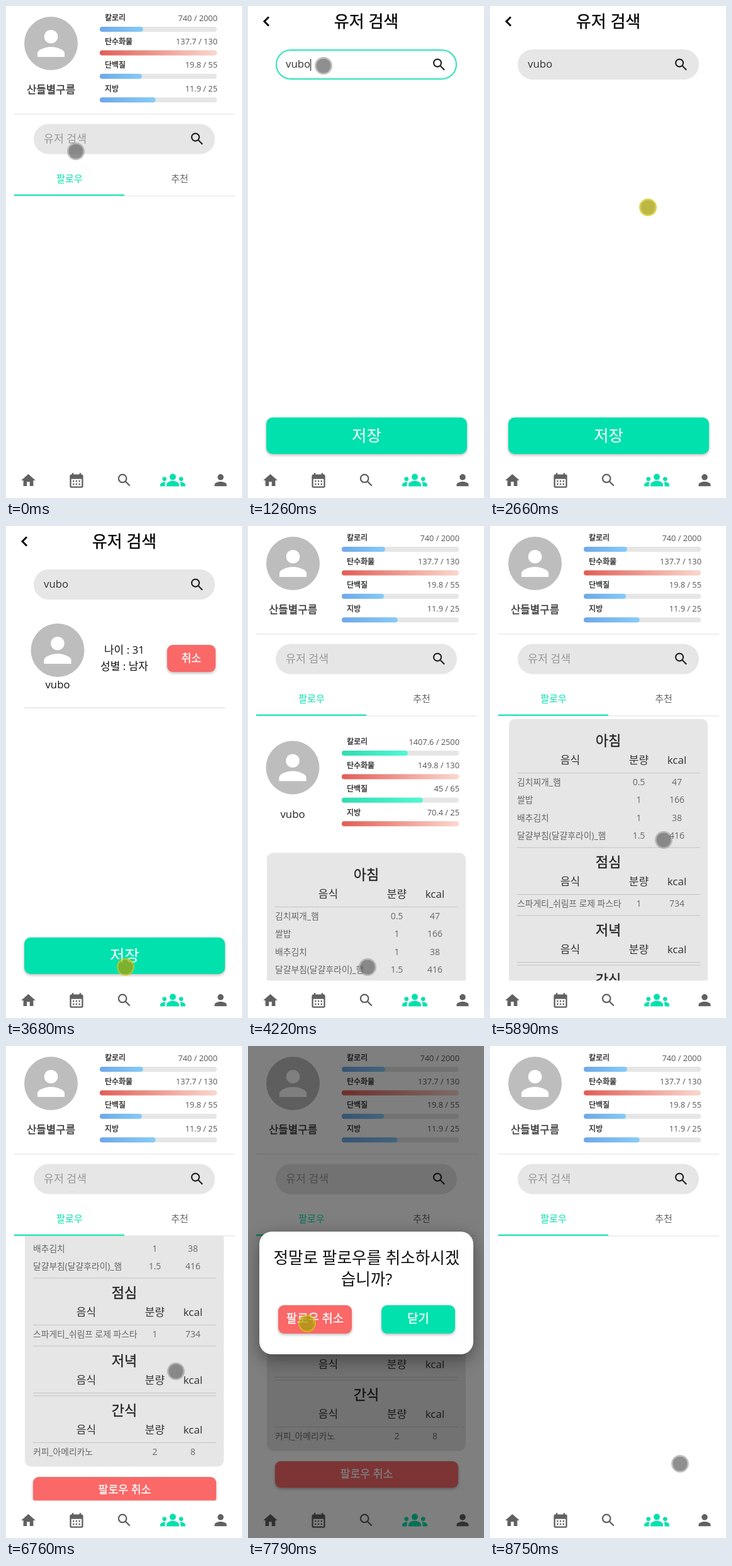
An HTML page for the animation above (8.82 s loop, 375x782 px).

```html
<!DOCTYPE html>
<html lang="ko">
<head>
<meta charset="utf-8">
<title>유저 검색</title>
<style>
html, body { margin: 0; width: 100%; height: 100%; overflow: hidden; background: #fff; }
svg { display: block; width: 375px; height: 782px; }
text { font-family: "Open Sans", "Noto Sans CJK KR", "Noto Sans CJK JP", sans-serif; white-space: pre; }
.med { stroke: currentColor; stroke-width: .3px; }
.btn { filter: drop-shadow(0 2px 2px rgba(0, 0, 0, .28)); }
.line { fill: none; stroke: currentColor; stroke-width: 2px; }
#box { filter: drop-shadow(0 8px 14px rgba(0, 0, 0, .4)); }
</style>
</head>
<body>
<svg id="stage" viewBox="0 0 375 782" xmlns="http://www.w3.org/2000/svg"></svg>
<script>
const LOOP = 8820;
const MINT = '#00e1ad', RED = '#fa6868', GREY = '#e6e6e6', DARK = '#616161';
const ME = '산들별구름', FRIEND = 'vubo';

const disc = (x, y, r, attrs = '') => `<circle cx="${x}" cy="${y}" r="${r}" ${attrs}/>`;
const path = (d, attrs = '') => `<path d="${d}" ${attrs}/>`;
const rect = (x, y, w, h, r, fill, attrs = '') =>
  `<rect x="${x}" y="${y}" width="${w}" height="${h}" rx="${r}" fill="${fill}" ${attrs}/>`;

// Icons on a 24 unit square
const person = disc(12, 8, 4) + path('M4 20v-2c0-2.7 5.3-4 8-4s8 1.3 8 4v2z');
const search = disc(9.5, 9.5, 5.5, 'class="line"') + path('M13.8 13.8l5.9 5.9', 'class="line"');
const house = path('M10 20v-6h4v6h5v-8h3L12 3 2 12h3v8z');
let calendar = rect(4, 5, 16, 16, 1, 'none', 'class="line"') + path('M4 5h16v5H4zM6 2h2v3H6zM16 2h2v3h-2z');
for (let i = 0; i < 6; i++) calendar += rect(7 + 4 * (i % 3), i < 3 ? 12 : 16, 2, 2, 0, 'currentColor');
const member = disc(4, 11, 2) + path('M0 18v-1.6c0-1.5 3-2.9 5.1-2.3q-.6 1-.6 2.3V18z');
const group = disc(12, 9, 3) + path('M6 18v-1.6c0-2.4 3.5-3.65 6-3.65s6 1.25 6 3.65V18z') +
  member + `<g transform="translate(24 0) scale(-1 1)">${member}</g>`;

// Icon with its own point (ox, oy) placed at (x, y)
const icon = (art, x, y, k, fill, ox = 12, oy = 12) =>
  `<g fill="${fill}" color="${fill}" transform="translate(${x} ${y}) scale(${k}) translate(${-ox} ${-oy})">${art}</g>`;
// Text centred vertically on cy
const text = (x, cy, s, size, fill, anchor = 'middle', attrs = '') =>
  `<text x="${x}" y="${cy + .36 * size}" font-size="${size}" fill="${fill}" color="${fill}" text-anchor="${anchor}" ${attrs}>${s}</text>`;
const med = (x, cy, s, size, fill, anchor) => text(x, cy, s, size, fill, anchor, 'class="med"');
const button = (x, y, w, h, s, size, fill) =>
  rect(x, y, w, h, 9, fill, 'class="btn"') + med(x + w / 2, y + h / 2 - 1, s, size, '#fff');
const avatar = (x, y) => disc(x, y, 42.5, 'fill="#bdbdbd"') + icon(person, x, y, 2.7, '#fff');
const lens = y => icon(search, 303.5, y, 1.09, '#222', 11.75, 11.75);
const rule = y => rect(13, y, 351, 1.6, 0, '#ebebeb');

const NUTRIENTS = ['칼로리', '탄수화물', '단백질', '지방'];
function stats(y, pairs, tint) {
  return pairs.map(([now, max], i) => {
    const cy = y + 37.4 * i, part = Math.min(1, now / max);
    return med(157, cy, NUTRIENTS[i], 12, '#222', 'start') +
      text(336, cy, `${now} / ${max}`, 12.8, '#555', 'end') +
      rect(149, cy + 14, 186, 8, 4, GREY) +
      rect(149, cy + 14, 186 * part, 8, 4, `url(#${part < 1 ? tint : 'red'})`);
  }).join('');
}

const MEALS = [
  ['아침', [['김치찌개_햄', .5, 47], ['쌀밥', 1, 166], ['배추김치', 1, 38], ['달걀부침(달걀후라이)_햄', 1.5, 416]]],
  ['점심', [['스파게티_쉬림프 로제 파스타', 1, 734]]],
  ['저녁', []],
  ['간식', [['커피_아메리카노', 2, 8]]]
];
function meals() {
  const line = y => rect(43, y - .5, 291, 1, 0, '#c4c4c4');
  let y = 555, out = rect(30, 519.5, 316, 504, 10, GREY);
  MEALS.forEach(([name, rows], n) => {
    out += med(188, y - 1, name, 22, '#222');
    [['음식', 127.5], ['분량', 236.5], ['kcal', 297]].forEach(([s, x]) => out += text(x, y + 29.5, s, 17, '#333'));
    out += line(y + 50.5);
    rows.forEach(([food, amount, kcal], i) => {
      const cy = y + 65 + 28.3 * i;
      out += text(43, cy, food, 13.8, '#666', 'start') + text(236.5, cy, amount, 14, '#666') + text(297, cy, kcal, 14, '#666');
    });
    const end = rows.length ? y + 84 + 28.3 * (rows.length - 1) : y + 55;
    if (n < 3) out += line(end);
    y = end + 24;
  });
  return out;
}

const grad = (id, a, b) =>
  `<linearGradient id="${id}"><stop stop-color="${a}"/><stop offset="1" stop-color="${b}"/></linearGradient>`;

const profile =
  avatar(71.5, 59.5) + med(71.5, 133, ME, 16.8, '#333') +
  stats(19, [[740, 2000], [137.7, 130], [19.8, 55], [11.9, 25]], 'blue') + rule(171);

const tabs =
  rect(44, 187.5, 288, 48, 24, GREY) + text(60, 211, '유저 검색', 17.3, '#999', 'start') + lens(211) +
  text(101, 275, '팔로우', 15, MINT) + text(276, 275, '추천', 15, '#666') +
  rule(301) + rect(13, 299.6, 175, 2, 0, MINT);

const list =
  avatar(71, 384) + text(71, 458, FRIEND, 16.8, '#222') +
  stats(343, [[1407.6, 2500], [149.8, 130], [45, 65], [70.4, 25]], 'green') +
  meals() + button(43, 1040, 291, 42, '팔로우 취소', 17.3, RED);

const result =
  avatar(82, 197.5) + text(82, 252, FRIEND, 16.8, '#111') +
  text(188, 197, '나이 : 31', 17, '#111') + text(188, 223, '성별 : 남자', 17, '#111') +
  `<g id="follow">${button(256, 189, 77, 43, '팔로우', 17, MINT)}</g>` +
  `<g id="undo">${button(256, 189, 77, 43, '취소', 17, RED)}</g>` +
  rect(29, 288.4, 319, 1.4, 0, '#dedede');

const find =
  path('M33 17.5L26 24.5L33 31.5', 'fill="none" stroke="#000" stroke-width="3"') +
  med(188, 25, '유저 검색', 26, '#000') +
  rect(45, 70, 286, 46, 23, GREY, 'id="field" stroke-width="2"') +
  text(60, 93, '유저 검색', 17.3, '#999', 'start', 'id="hint"') +
  text(60, 92, '', 16.8, '#333', 'start', 'id="query"') +
  rect(0, 84, 1, 19, 0, '#000', 'id="caret"') + lens(93) + `<g id="result">${result}</g>` +
  rect(29, 654, 319, 58, 10, MINT, 'class="btn"') + text(188.5, 682.5, '저장', 25.5, '#fff');

const nav =
  icon(house, 35.5, 753.5, 1.13, DARK, 12, 11.5) +
  icon(calendar, 112, 754, 1.18, DARK) +
  icon(search, 187.7, 753.5, 1.14, DARK, 11.75, 11.75) +
  icon(group, 265, 753.5, 1.66, MINT) +
  icon(person, 341, 753.7, 1.2, DARK);

const dialog =
  rect(0, 0, 375, 782, 0, 'rgba(0,0,0,.5)') + rect(18, 295, 340, 195, 20, '#fff', 'id="box"') +
  text(188.5, 337, '정말로 팔로우를 취소하시겠', 25.6, '#111') + text(188.5, 371, '습니까?', 25.6, '#111') +
  button(48, 412, 117, 45, '팔로우 취소', 18.8, RED) + button(212, 412, 117, 45, '닫기', 18.8, MINT);

document.getElementById('stage').innerHTML =
  '<defs>' + grad('blue', '#6ea8e8', '#86cbf7') + grad('green', '#30dcb0', '#50f8d4') + grad('red', '#e25d55', '#fbd8ce') +
  '<clipPath id="view"><rect x="0" y="302" width="375" height="420.5"/></clipPath></defs>' +
  rect(0, 0, 375, 782, 0, '#fff') +
  `<g id="home">${profile}${tabs}<g clip-path="url(#view)"><g id="list">${list}</g></g></g>` +
  `<g id="find">${find}</g>${nav}<g id="dialog">${dialog}</g>` +
  `<g id="dot">${disc(0, 0, 12.7, 'id="rim" fill="none" stroke-width="2.6"')}${disc(0, 0, 11.5, 'id="core"')}</g>`;

const el = {};
document.querySelectorAll('[id]').forEach(e => el[e.id] = e);

// Pointer moves: from, to, x, y
const MOVES = [
  [300, 560, 120, 95], [2500, 2580, 251, 320], [3055, 3130, 285, 290], [3130, 3270, 294, 212],
  [3400, 3600, 190, 701], [4300, 4740, 251, 451], [4900, 5020, 251, 530], [5020, 5150, 276, 499],
  [6700, 6755, 270, 517], [6990, 7190, 188, 680], [7590, 7720, 94, 441], [7900, 8070, 274, 537],
  [8740, 8745, 302, 664]
];
const PRESSES = [[70, 200], [915, 985], [2650, 2715], [3330, 3400], [3630, 3770], [7240, 7320], [7740, 7860]];
// Value changes: from, to, value
const SCROLL = [[5320, 5630, 178], [5780, 6170, 355], [6800, 6960, 380]];
const FADE = [[7330, 7560, 1], [7870, 8050, 0]];
const TYPED = [940, 985, 1185, 1255];

const ease = p => p * p * (3 - 2 * p);
function track(steps, t, value, col = 2) {
  for (const s of steps) {
    const p = Math.max(0, Math.min(1, (t - s[0]) / (s[1] - s[0])));
    value += (s[col] - value) * ease(p);
  }
  return value;
}
const within = (t, a, b) => t >= a && t < b;
const show = (e, on) => e.style.display = on ? '' : 'none';

function drawFind(t) {
  const focus = within(t, 915, 2650), count = TYPED.filter(k => t >= k).length;
  el.field.setAttribute('fill', focus ? '#fff' : GREY);
  el.field.setAttribute('stroke', focus ? '#2fe3b8' : GREY);
  el.query.textContent = FRIEND.slice(0, count);
  show(el.hint, !count);
  show(el.caret, focus && !within(t, 1785, 2250));
  el.caret.setAttribute('x', 60 + (count ? el.query.getComputedTextLength() : 0));
  show(el.result, t >= 2875);
  show(el.follow, t < 3400);
  show(el.undo, t >= 3400);
}

function draw(t) {
  const finding = within(t, 270, 3820);
  show(el.home, !finding);
  show(el.find, finding);
  if (finding) drawFind(t);
  show(el.list, within(t, 4050, 7960));
  el.list.setAttribute('transform', `translate(0 ${-track(SCROLL, t, 0)})`);

  const fade = track(FADE, t, 0);
  show(el.dialog, fade > 0);
  el.dialog.setAttribute('opacity', fade);

  const pressed = PRESSES.some(([a, b]) => within(t, a, b));
  show(el.dot, !within(t, 1590, 2585));
  el.dot.setAttribute('transform', `translate(${track(MOVES, t, 111)} ${track(MOVES, t, 231, 3)})`);
  el.core.setAttribute('fill', pressed ? 'rgba(167,160,5,.75)' : 'rgba(95,95,95,.7)');
  el.rim.setAttribute('stroke', pressed ? 'rgba(208,198,20,.75)' : 'rgba(150,150,150,.6)');
}

const start = performance.now();
function tick() {
  draw((performance.now() - start) % LOOP);
  requestAnimationFrame(tick);
}
tick();
</script>
</body>
</html>
```
